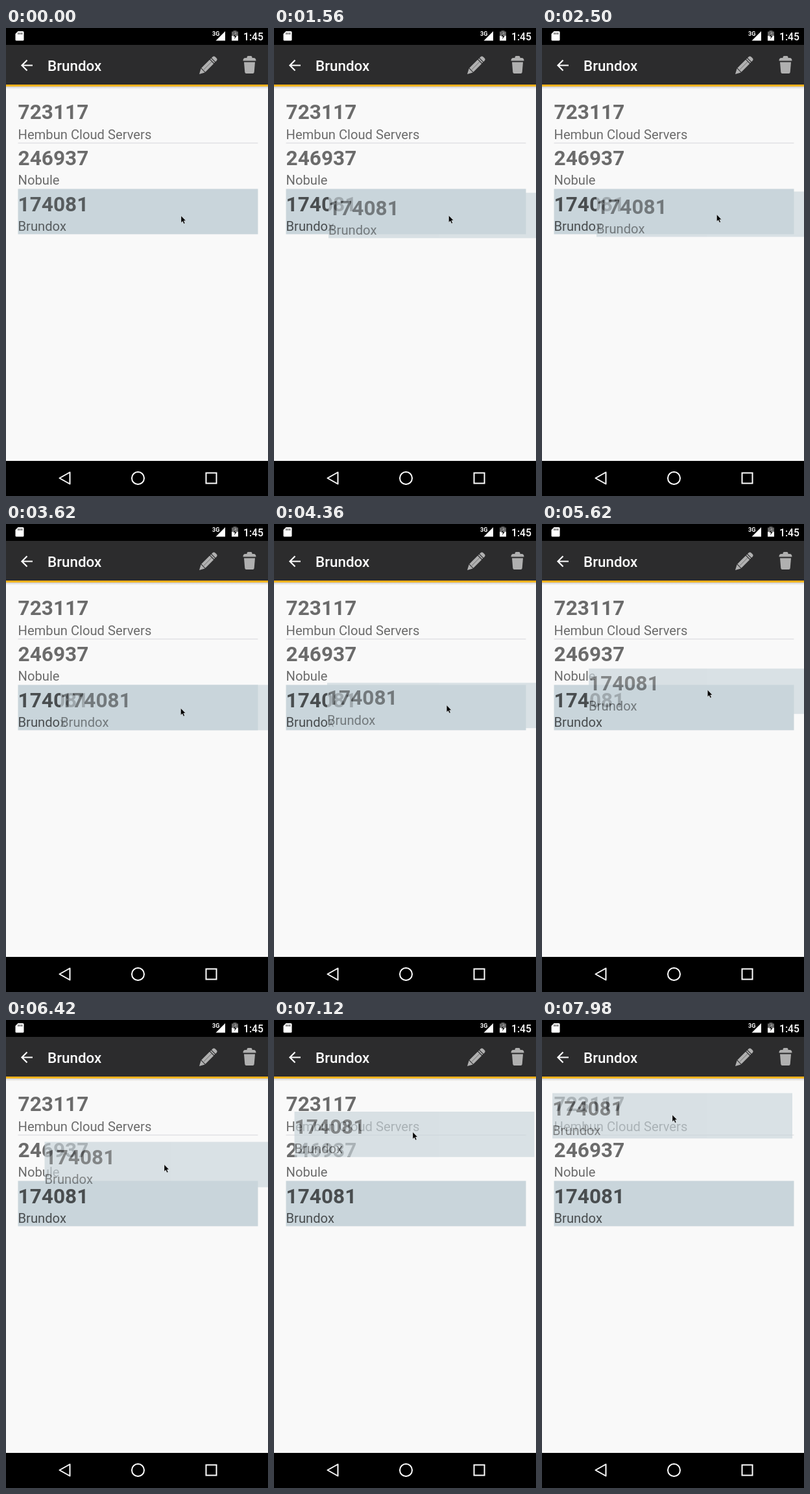
Recreate the animation shown at these times as an HTML page. Size 404 px wide and 720 px high, loop 8000 ms.

```html
<!DOCTYPE html>
<html lang="en">
<head>
<meta charset="utf-8">
<title>Drag a list entry</title>
<style>
  html, body { margin: 0; width: 100%; height: 100%; overflow: hidden; background: #000; }
  svg { display: block; width: 100%; height: 100%; font-family: Roboto, sans-serif; }
  .code { font-size: 31.6px; font-weight: 700; }
  .name { font-size: 20.2px; }
  .nav { fill: none; stroke: #fff; stroke-width: 2; }
</style>
</head>
<body>
<svg viewBox="0 0 404 720">
  <defs>
    <linearGradient id="fade" x2="0" y2="1">
      <stop stop-color="#cfcfcf"/>
      <stop offset="1" stop-color="#f9f9f9"/>
    </linearGradient>
  </defs>

  <rect width="404" height="720" fill="#f9f9f9"/>
  <rect y="90" width="404" height="4" fill="url(#fade)"/>
  <g id="list"></g>

  <!-- status bar -->
  <rect width="404" height="26" fill="#000"/>
  <path d="M18.5 5H26q1.5 0 1.5 1.500V18q0 1.500-1.500 1.500H16q-1.500 0-1.500-1.500V9z" fill="#fff"/>
  <path d="M19 7v3M21.700 7v3M24.400 7v3" stroke="#000" stroke-width="1"/>
  <text x="318" y="11.500" font-size="9" font-weight="700" fill="#fff">3G</text>
  <path d="M338 5V19.500H323.500z" fill="#fff"/>
  <path d="M350.500 5.500V4h5v1.500h2.500V12h-10V5.500z" fill="#666"/>
  <path d="M348 12h10v7.500h-10z" fill="#fff"/>
  <path d="M354.500 7l-4.500 6h2.700l-.9 5 4.400-6.200h-2.700z" fill="#000" stroke="#fff" stroke-width=".5"/>
  <text x="366" y="18.500" font-size="15.700" font-weight="500" fill="#fff">1:45</text>

  <!-- app bar -->
  <rect y="26" width="404" height="61" fill="#2c2c2d"/>
  <rect y="87" width="404" height="3" fill="#fbb41f"/>
  <path d="M41 57.500H25M32.500 49.500l-8 8 8 8" fill="none" stroke="#fff" stroke-width="2.200"/>
  <text id="title" x="64" y="65.500" font-size="22.400" font-weight="500" fill="#fff"></text>
  <g transform="translate(298 71) rotate(-45)" fill="#b0b0b0">
    <path d="M0 0L8-4.300V4.300z"/>
    <path d="M9-4.300H27V4.300H9zM28.200-4.300h1.800V4.300h-1.800zM31.200-4.300h2q3 0 3 3V1.300q0 3-3 3h-2z"/>
    <path d="M10 0H27" stroke="#6c6c6c" stroke-width=".8"/>
  </g>
  <g fill="#b0b0b0">
    <path d="M371.500 46V45q0-2 2-2h4q2 0 2 2v1H382q3.500 0 3.500 4.500h-20q0-4.500 3.500-4.500z"/>
    <path d="M367 52.500h17l-1.300 15.500q-.2 2-2.200 2h-10q-2 0-2.200-2z"/>
  </g>

  <!-- navigation bar -->
  <rect y="666" width="404" height="54" fill="#000"/>
  <path class="nav" stroke-linejoin="round" d="M82.500 692.500L98.500 683.500V701.500z"/>
  <circle class="nav" cx="203.500" cy="692.500" r="9.500"/>
  <rect class="nav" x="308.500" y="684.500" width="16" height="16"/>

  <g id="ghost" opacity=".67"></g>
  <path id="cursor" d="M0 0V10.500L2.400 8.300 4.200 12.200 5.900 11.400 4.200 7.600H7.300z"
        fill="#000" stroke="#fff" stroke-opacity=".6" stroke-width=".6"/>
</svg>
<script>
const LOOP = 8000, ROW = 70.6;
const entries = [
  ["723117", "Hembun Cloud Servers"],
  ["246937", "Nobule"],
  ["174081", "Brundox"]
];
const byId = id => document.getElementById(id);
const list = byId("list"), ghost = byId("ghost"), cursor = byId("cursor");

const rowText = ([code, name], i, alpha) => `<g fill="#000" fill-opacity="${alpha}">
  <text class="code" x="18.500" y="${140.3 + i * ROW}">${code}</text>
  <text class="name" x="18.500" y="${170.6 + i * ROW}">${name}</text></g>`;
const plate = '<rect x="18.500" y="247.500" width="370" height="69.800" fill="#c9d5db"/>';

list.innerHTML = '<path d="M18.500 177h370" stroke="#d6d6da"/>' + plate +
  entries.map((e, i) => rowText(e, i, 0.57)).join("");
ghost.innerHTML = plate + rowText(entries[2], 2, 0.64);
byId("title").textContent = entries[2][1];
const picked = list.lastElementChild;

// Playback runs in bursts: two poses of 20 ms, then one of 100 ms
function poseAt(ms) {
  const u = ms % LOOP + 20;
  return 3 * Math.floor(u / 140) + Math.min(2, Math.floor(u % 140 / 20));
}
const DRAG = poseAt(840);

// pose, ghost offset x y, pointer x y
const path = [
  [1, 66, 7, 270, 289],
  [35, 65.5, 6, 269.5, 288.5],
  [78, 65.5, 0, 269.5, 283.5],
  [108, 60, -7.5, 261.5, 272.5],
  [138, 41, -60, 244, 222.5],
  [153, 13, -106.5, 214, 172.5],
  [172, -2.5, -135, 201, 146]
];

// Monotone cubic through the path points
function slope(k, c) {
  if (k < 1 || k > path.length - 2) return 0;
  const [a, b, d] = [path[k - 1], path[k], path[k + 1]];
  const m = (b[c] - a[c]) / (b[0] - a[0]), n = (d[c] - b[c]) / (d[0] - b[0]);
  return m * n > 0 ? 2 * m * n / (m + n) : 0;
}
function at(pose, c) {
  const k = path.findIndex(p => p[0] > pose) - 1;
  if (k < 0) return path[path.length - 1][c];
  const a = path[k], b = path[k + 1], h = b[0] - a[0], u = (pose - a[0]) / h, v = 1 - u;
  return v * v * ((1 + 2 * u) * a[c] + u * h * slope(k, c)) +
         u * u * ((1 + 2 * v) * b[c] - v * h * slope(k + 1, c));
}

function draw(ms) {
  const pose = poseAt(ms), dragging = pose >= DRAG;
  const move = (el, c) => el.setAttribute("transform",
    `translate(${at(pose, c).toFixed(2)} ${at(pose, c + 1).toFixed(2)})`);
  move(ghost, 1);
  move(cursor, 3);
  ghost.setAttribute("visibility", dragging ? "visible" : "hidden");
  picked.setAttribute("fill-opacity", dragging ? 0.64 : 0.57);
}

const start = performance.now();
function frame() {
  draw(performance.now() - start);
  requestAnimationFrame(frame);
}
frame();
</script>
</body>
</html>
```
